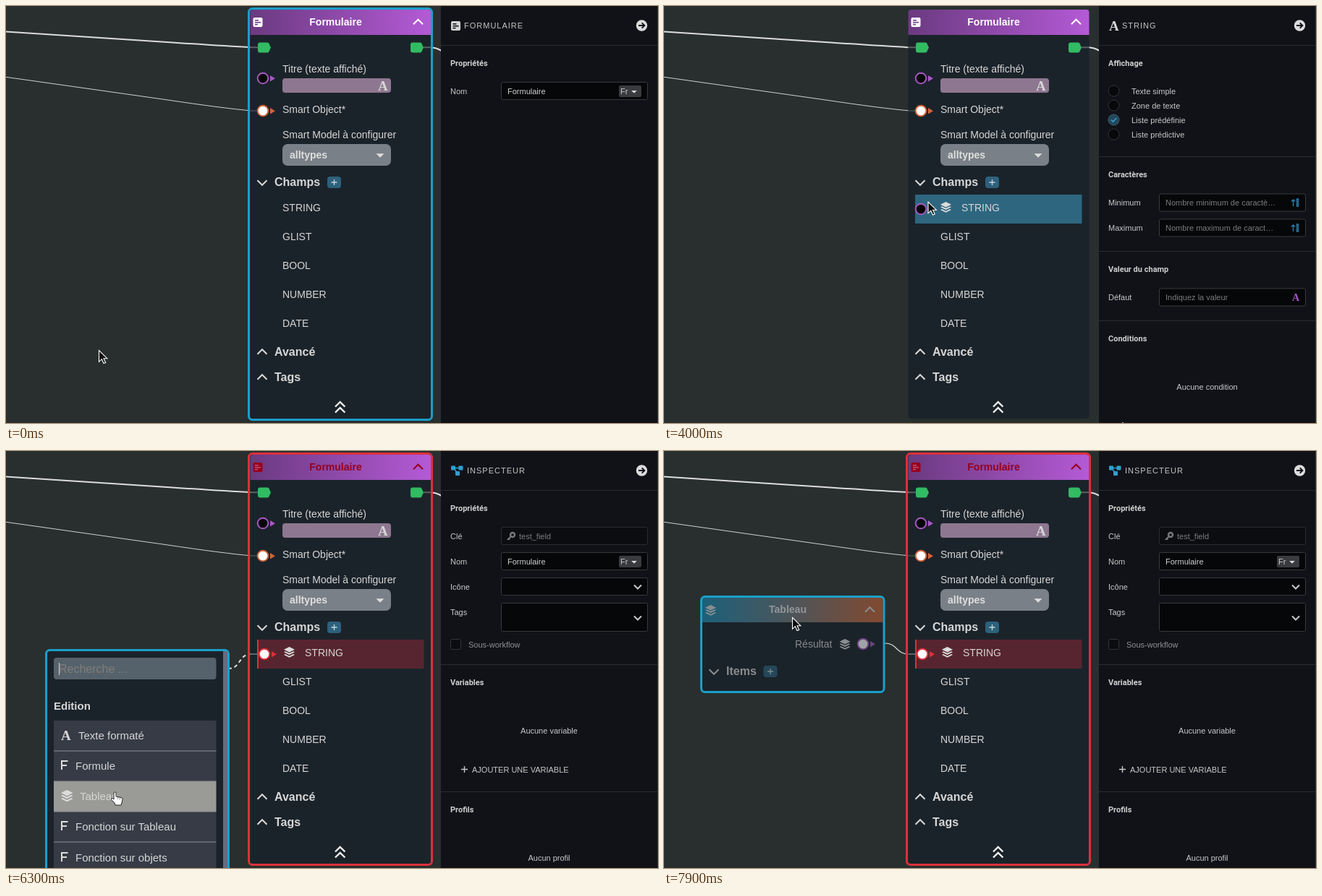
Write an HTML page that moves like this. It is 901 px wide and 577 px high and loops after 8000 ms.

```html
<!DOCTYPE html>
<html lang="fr">
<head>
<meta charset="utf-8">
<title>Formulaire</title>
<style>
html, body { margin: 0; width: 100%; height: 100%; overflow: hidden; background: #282f2e; }
svg { display: block; width: 901px; height: 577px; }
text { font: 14px "Liberation Sans", Arial, sans-serif; fill: #d6d6d6; white-space: pre; }
.b { font-weight: 700; }
.h { font: 700 16px "Liberation Sans", Arial, sans-serif; }
.m { font-size: 15px; }
.p { font-size: 11px; fill: #c8c8c8; }
.s { font: 700 11px Roboto, sans-serif; fill: #cfcfcf; }
.t { font-size: 11px; letter-spacing: 1px; fill: #c4c4c4; }
.g { font-size: 11px; fill: #7c7c80; }
.c { text-anchor: middle; }
.serif { font: 700 19px "Liberation Serif", Times, serif; }
</style>
</head>
<body>
<svg id="stage" viewBox="0 0 901 577"></svg>
<script>
const BLUE = '#1b9fc9', RED = '#dc303c', BODY = '#1b232a', DARK = '#111218', PURPLE = '#a857c4';

const txt = (x, y, s, cls = '', fill = '') =>
  `<text x="${x}" y="${y}" class="${cls}"${fill && ` style="fill:${fill}"`}>${s}</text>`;
const rect = (x, y, w, h, fill, r = 0, extra = '') =>
  `<rect x="${x}" y="${y}" width="${w}" height="${h}" rx="${r}" fill="${fill}" ${extra}/>`;
const line = (d, color = '#d8d8d8', w = 2, extra = '') =>
  `<path d="${d}" fill="none" stroke="${color}" stroke-width="${w}" ${extra}/>`;
const fill = (d, color) => `<path d="${d}" fill="${color}"/>`;
const group = (id, body, extra = '') => `<g id="${id}" ${extra}>${body}</g>`;
const chevron = (x, y, dy, color = '#d8d8d8', r = 6.5) =>
  line(`M${x - r} ${y - dy / 2}l${r} ${dy} ${r} ${-dy}`, color);
const caret = (x, y, r, color = '#dedede') => fill(`M${x - r} ${y}h${2 * r}l${-r} ${r}z`, color);
const plus = (x, y, r, color, w = 1.3) => line(`M${x - r} ${y}h${2 * r}M${x} ${y - r}v${2 * r}`, color, w);
const badge = (x, y) => rect(x, y, 19, 16, '#2d617c', 4) + plus(x + 9.5, y + 8, 4, '#c8d6dd');
const port = (x, y, ring, core) =>
  `<circle cx="${x}" cy="${y}" r="7.3" fill="${core}" stroke="${ring}" stroke-width="2"/>` +
  fill(`M${x + 10} ${y - 4}l7 4.3-7 4.3z`, ring);
const hex = x => fill(`M${x + 3} 50.5h10q1.5 0 2.2 1l2.8 6-2.8 6q-.7 1-2.2 1h-10q-3 0-3-3v-8q0-3 3-3z`, '#31bb62');
const layers = (x, y, k = 1, color = '#dcdcdc') =>
  `<g transform="translate(${x} ${y}) scale(${k})" fill="${color}"><path d="M7.5 0l7.5 3.7-7.5 3.7L0 3.7z"/>` +
  [6.3, 10.2].map(v => `<path d="M0 ${v + .9}l2-1 5.5 2.6 5.5-2.6 2 1-7.5 3.7z"/>`).join('') + '</g>';
const formIcon = (x, y, color, ink) => rect(x, y, 13, 13, color, 2) +
  rect(x + 2.5, y + 3, 5, 1.6, ink) + rect(x + 2.5, y + 5.9, 8, 1.6, ink) + rect(x + 2.5, y + 8.8, 4, 1.6, ink);
const fIcon = y => line(`M77 ${y}v-12h8.5M77 ${y - 6}h7`, '#dcdcdc', 2);

/* right panel */
const sep = y => rect(601, y, 299, 1, '#2b2c32');
const input = (y, h = 24, stroke = '#38393d', bg = '#060708') =>
  rect(684.5, y + .5, 202, h, bg, 2, `stroke="${stroke}"`);
const digits = y => line(`M869.5 ${y + 5}v-9m-2.5 2.5l2.5-2.5 2.5 2.5M874.5 ${y - 1}v-4h2v4zM874.5 ${y + 5}h2v-4h-2z`, '#2b7cab', 1.4);
const lang = y => rect(847, y - 8, 31, 16, '#3a3b3f', 2) + txt(849, y + 4, 'Fr', 'p') + caret(868, y - 1, 3.8);
const nameRow = y => txt(614, y + 4, 'Nom', 'p') + input(y - 13) + txt(693, y + 4, 'Formulaire', 'p', '#cfcfcf') + lang(y);
const numRow = (y, label, hint) => txt(614, y + 4, label, 'p') + input(y - 12.5) + txt(693, y + 4, hint, 'g') + digits(y);
const radio = (y, label) => `<circle cx="621.5" cy="${y}" r="7.5" fill="#07080a" stroke="#34353a"/>` + txt(646, y + 4.5, label, 'p');
const check = y => `<circle cx="621.5" cy="${y}" r="7.5" fill="#21485d" stroke="#35566a"/>` +
  line(`M618 ${y}l2.6 2.6 4.6-5`, '#42b0dd', 1.4);

const panelForm = formIcon(615, 21, '#d4d4d4', DARK) + txt(633, 31, 'FORMULAIRE', 't') +
  txt(614, 83, 'Propriétés', 's') + nameRow(118);

const panelString = txt(615, 34, 'A', 'serif') + txt(633, 31, 'STRING', 't') + txt(614, 83, 'Affichage', 's') +
  ['Texte simple', 'Zone de texte', 'Liste prédéfinie', 'Liste prédictive'].map((s, i) => radio(117.5 + 20 * i, s)).join('') +
  group('check0', check(117.5)) + group('check2', check(157.5)) +
  sep(208) + txt(614, 237, 'Caractères', 's') +
  numRow(272, 'Minimum', 'Nombre minimum de caractè…') + numRow(307, 'Maximum', 'Nombre maximum de caract…') +
  sep(339) + txt(614, 368, 'Valeur du champ', 's') +
  txt(614, 407, 'Défaut', 'p') + input(390.5) + txt(693, 407, 'Indiquez la valeur', 'g') +
  `<text x="868" y="408" class="serif" style="font-size:14px;fill:${PURPLE}">A</text>` +
  sep(435) + txt(614, 464, 'Conditions', 's') + txt(750.5, 531, 'Aucune condition', 'p c') +
  rect(633, 576, 2, 1, '#b0b0b0');

const panelInspect = line('M619 23.5h8M619 24l5 7', '#2f9fd0', 1.6) +
  rect(615, 20.5, 6, 6, '#2f9fd0', 1) + rect(625.5, 20.5, 6, 6, '#2f9fd0', 1) + rect(621, 28, 6, 6, '#2f9fd0', 1) +
  txt(637, 31, 'INSPECTEUR', 't') + txt(614, 83, 'Propriétés', 's') +
  txt(614, 122, 'Clé', 'p') + input(105, 24, '#2a2b2f', '#0c0d11') +
  `<circle cx="700" cy="116" r="3" fill="none" stroke="#77777b" stroke-width="2.4"/>` +
  line('M698 118l-4 4h2.5', '#77777b', 2) + txt(709, 122, 'test_field', 'g') + nameRow(153) +
  txt(614, 192, 'Icône', 'p') + input(175) + chevron(873, 188, 5, '#c8c8c8', 5) +
  txt(614, 227, 'Tags', 'p') + input(210, 39) + chevron(873, 231, 5, '#c8c8c8', 5) +
  rect(614.5, 260.5, 14, 14, '#0b0c10', 2, 'stroke="#34353a"') + txt(639, 272, 'Sous-workflow', 'p', '#8f8f92') +
  sep(295) + txt(614, 324, 'Variables', 's') + txt(750.5, 391, 'Aucune variable', 'p c') +
  plus(633.5, 440.5, 4.5, '#c8c8c8', 1.4) + txt(644, 445, 'AJOUTER UNE VARIABLE', 'p') +
  sep(471) + txt(614, 500, 'Profils', 's') + txt(750.5, 567, 'Aucun profil', 'p c');

const panel = rect(601, 0, 299, 577, DARK) + sep(54) +
  '<circle cx="878.5" cy="27" r="7.7" fill="#dcdcdc"/>' + line('M874 27h8M878.7 23.3l3.7 3.7-3.7 3.7', DARK, 1.9) +
  group('panelForm', panelForm) + group('panelString', panelString) + group('panelInspect', panelInspect);

/* form node */
const title = (color, iconInk) => formIcon(341.5, 16, color, iconInk) +
  txt(455.5, 27, 'Formulaire', 'b c', color) + chevron(569.5, 22, -6.5, color);
const frame = color => rect(335.5, 3.5, 253, 569, 'none', 5, `stroke="${color}" stroke-width="3"`);
const dim = '#59605f';

const node = rect(337.5, 5, 250, 566, BODY, 4) +
  '<path d="M337.5 40V9q0-4 4-4h242q4 0 4 4v31z" fill="url(#violet)"/>' +
  group('titleOk', title('#fff', '#70408a')) + group('titleBad', title('#98001c', '#c05070')) +
  line('M338 57.3h10M577 57.3h10', dim) + line('M338 145h10', dim, 1) +
  txt(382, 92, 'Titre (texte affiché)') + rect(382, 100, 150, 20, '#8e7790', 4) + txt(514, 116.5, 'A', 'serif') +
  txt(382, 148, 'Smart Object*') + txt(382, 183, 'Smart Model à configurer') +
  rect(382, 191, 150, 30, '#7a8087', 7) + txt(392, 211, 'alltypes', 'b', '#dedede') + caret(517, 204.3, 5.5) +
  chevron(354, 244.5, 6.5) + txt(371, 249, 'Champs', 'h') + badge(444, 236) +
  group('rowBlue', rect(347, 261, 230.5, 40, '#2e667f')) +
  group('rowRed', rect(347, 261, 230.5, 40, '#57252f') + rect(347, 261, 2, 40, RED)) +
  group('label', group('labelIcon', layers(382, 271)) + '<text id="labelText" y="284">STRING</text>') +
  ['GLIST', 'BOOL', 'NUMBER', 'DATE'].map((s, i) => txt(382, 324 + 40 * i, s)).join('') +
  chevron(354, 478.5, -6.5) + txt(371, 484, 'Avancé', 'h') +
  chevron(354, 513.5, -6.5) + txt(371, 519, 'Tags', 'h') +
  line('M455 554.5l6.7-6.5 6.7 6.5M455 562.5l6.7-6.5 6.7 6.5', '#f0f0f0', 2.4) +
  group('stub', line('M338 281h10', '#6d7c84', 1.5)) +
  group('ports', hex(348) + hex(559) + port(355, 100, PURPLE, '#050506') + port(355, 145, '#d3633a', '#fff') +
    group('portNew', port(355, 281, PURPLE, '#050506')) + group('portBad', port(357, 281, RED, '#fff'))) +
  group('frameBlue', frame(BLUE)) + group('frameRed', frame(RED));

/* search menu */
const rows = [['A', 100, 'Texte formaté'], ['F', 96, 'Formule'], ['L', 102, 'Tableau'],
  ['F', 96, 'Fonction sur Tableau'], ['F', 96, 'Fonction sur objets']];
const icon = (k, y) => k === 'A' ? txt(76, y + 1, 'A', 'serif') : k === 'F' ? fIcon(y) : layers(76, y - 14, 1.1);
const menu = rect(55.5, 275.5, 252, 320, BODY, 5, `stroke="${BLUE}" stroke-width="3"`) +
  rect(300, 277, 6, 300, '#666c7e') + rect(66, 286, 224.5, 30, '#56626b', 4) +
  txt(73, 307, 'Recherche ...', '', '#7f7d7b').replace('class=""', 'font-size="16"').replace('style="', 'style="font-size:16px;') +
  rect(73, 293, 1, 17, '#d0d0d0') + txt(66, 358, 'Edition', 'b m') +
  rows.map(([k, x, s], i) => {
    const y = 373 + 42 * i;
    return `<rect class="row" x="66" y="${y}" width="224.5" height="42" fill="#363b46"/>` +
      (i ? rect(66, y - .5, 224.5, 1, '#8b8d92') : '') + icon(k, y + 26 + (i === 4)) + txt(x, y + 26 + (i === 4), s, 'm');
  }).join('');

/* table node, local origin at its top left corner */
const table = rect(1.5, 1.5, 252.5, 132, BODY, 5) +
  group('tableBody', '<path d="M3 37V3h249.5v34z" fill="url(#warm)"/>' +
    layers(7, 13) + txt(121, 24, 'Tableau', 'b c', '#e8e8e8') + chevron(234.5, 19.5, -6.5) +
    txt(131, 72, 'Résultat') + layers(192.5, 60) + port(225, 67, PURPLE, '#fff') +
    chevron(19, 105.5, 6.5) + txt(36, 110, 'Items', 'h') + badge(87.5, 97)) +
  rect(1.5, 1.5, 252.5, 132, 'none', 5, `stroke="${BLUE}" stroke-width="3"`);

const ramp = (id, stops) => `<linearGradient id="${id}">` +
  stops.map((c, i) => `<stop offset="${i / (stops.length - 1)}" stop-color="${c}"/>`).join('') + '</linearGradient>';

const stage = document.getElementById('stage');
stage.innerHTML = '<defs>' + ramp('violet', ['#6b3a80', '#b45ad6']) + ramp('warm', ['#1f8db3', '#74797c', '#cc6636']) + '</defs>' +
  rect(0, 0, 901, 577, '#282f2e') +
  line('M0 35.6L230 50.5Q300 55.3 340 57.3', '#dcdcdc') + line('M0 98.3L220 129.5Q300 141.5 340 145', '#cfcfcf', 1) +
  line('M587 57.3Q594 57.6 602 62', '#dcdcdc') + '<path id="wire" fill="none" stroke="#dedede"/>' +
  node + group('menu', menu) + group('table', table) + panel +
  group('arrow', '<path d="M.5.5v15.8l3.8-3.6 2.7 5.9 2.7-1.2-2.7-5.7h4.8z" fill="#0c0c0c" stroke="#fff" stroke-width="1.1"/>') +
  group('hand', '<path d="M-2 1.5Q-2 0-.5 0T1 1.5V6l7 1.5q2 .5 2 2.5l-1 5-1 3H0l-1-3-4.5-4.5Q-6 8.5-4 8.5L-2 10z" fill="#fff" stroke="#111" stroke-width=".9"/>' +
    line('M3.6 7v3M6.4 7.6v3', '#555', .7));

const el = {};
stage.querySelectorAll('[id]').forEach(e => el[e.id] = e);
const menuRows = [...stage.querySelectorAll('.row')];

/* pointer: time, x, y */
const path = [[0, 128, 476], [300, 128, 476], [900, 412, 286], [1000, 412, 286], [1100, 415.5, 283], [1500, 415.5, 283],
  [2200, 650, 167], [2300, 650, 167], [2400, 657, 156], [3100, 657, 156], [3400, 651, 161], [3500, 651, 161],
  [3800, 379, 260], [3900, 379, 260], [4100, 350, 281], [4300, 350, 281], [4700, 308, 297], [4800, 308, 297],
  [5000, 304.5, 300.5], [5100, 304.5, 300.5], [5300, 294, 292], [5400, 294, 292], [6000, 180, 493], [6300, 151, 472],
  [6700, 151, 472], [7300, 181, 300], [7400, 181, 296], [7500, 181, 288], [7600, 176, 280], [7700, 173, 255],
  [7800, 174, 229], [7900, 177, 230]];
const tablePath = [[0, 54, 274], [7300, 54, 274], [7400, 54, 270], [7500, 54, 262], [7600, 49, 254],
  [7700, 46, 228], [7800, 47, 199], [7900, 50, 200]];

function at(keys, t) {
  const i = keys.findIndex(k => k[0] > t);
  if (i < 0) return keys[keys.length - 1].slice(1);
  const [a, b] = [keys[i - 1], keys[i]];
  const u = (t - a[0]) / (b[0] - a[0]), e = u * u * (3 - 2 * u);
  return [a[1] + (b[1] - a[1]) * e, a[2] + (b[2] - a[2]) * e];
}
const show = (id, on) => el[id].style.display = on ? '' : 'none';
const place = (id, x, y) => el[id].setAttribute('transform', `translate(${x} ${y})`);

function draw(t) {
  const [x, y] = at(path, t), [tx, ty] = at(tablePath, t);
  const picked = t >= 1400, list = t >= 3000, drag = t >= 4400 && t < 5200;
  const bad = t >= 5200, made = t >= 6600, open = bad && !made;

  show('panelForm', !picked); show('panelString', picked && !bad); show('panelInspect', bad);
  show('check0', !list); show('check2', list);
  show('titleOk', !bad); show('titleBad', bad);
  show('frameBlue', !picked); show('frameRed', bad);
  show('rowBlue', picked && !bad); show('rowRed', bad);
  show('labelIcon', list); show('portNew', list && !bad); show('portBad', bad);
  el.labelText.setAttribute('x', list ? 411 : 382);
  place('label', bad ? 2 : 0, 0);
  el.ports.setAttribute('opacity', drag ? .13 : 1);

  show('wire', drag || bad); show('stub', drag || bad);
  const [wx, wy] = made ? [tx + 255, ty + 66] : bad ? [308, 301] : [x, y + .5];
  const mid = (wx + 338) / 2;
  el.wire.setAttribute('d', `M340 281H338C${mid - 1} 281 ${mid + 1} ${wy} ${wx} ${wy}`);
  el.wire.setAttribute('stroke-width', made ? 1.2 : 2);
  el.wire.setAttribute('stroke-dasharray', made ? 'none' : '5 4');

  const overRow = open && x > 66 && x < 290 && y > 373;
  show('menu', open);
  menuRows.forEach((r, i) => r.setAttribute('fill', overRow && Math.floor((y - 373) / 42) === i ? '#9a9a96' : '#363b46'));
  show('table', made);
  place('table', tx, ty);
  el.tableBody.setAttribute('opacity', t >= 7400 ? .58 : 1);

  const hand = overRow || (x > 640 && t < 3600) || (t >= 4100 && t < 4400);
  show('hand', hand); show('arrow', !hand);
  place(hand ? 'hand' : 'arrow', x, y);
}

const start = performance.now();
function tick() {
  const t = (performance.now() - start) % 8000;
  draw(Math.floor(t / 100) * 100);
  requestAnimationFrame(tick);
}
tick();
</script>
</body>
</html>
```
